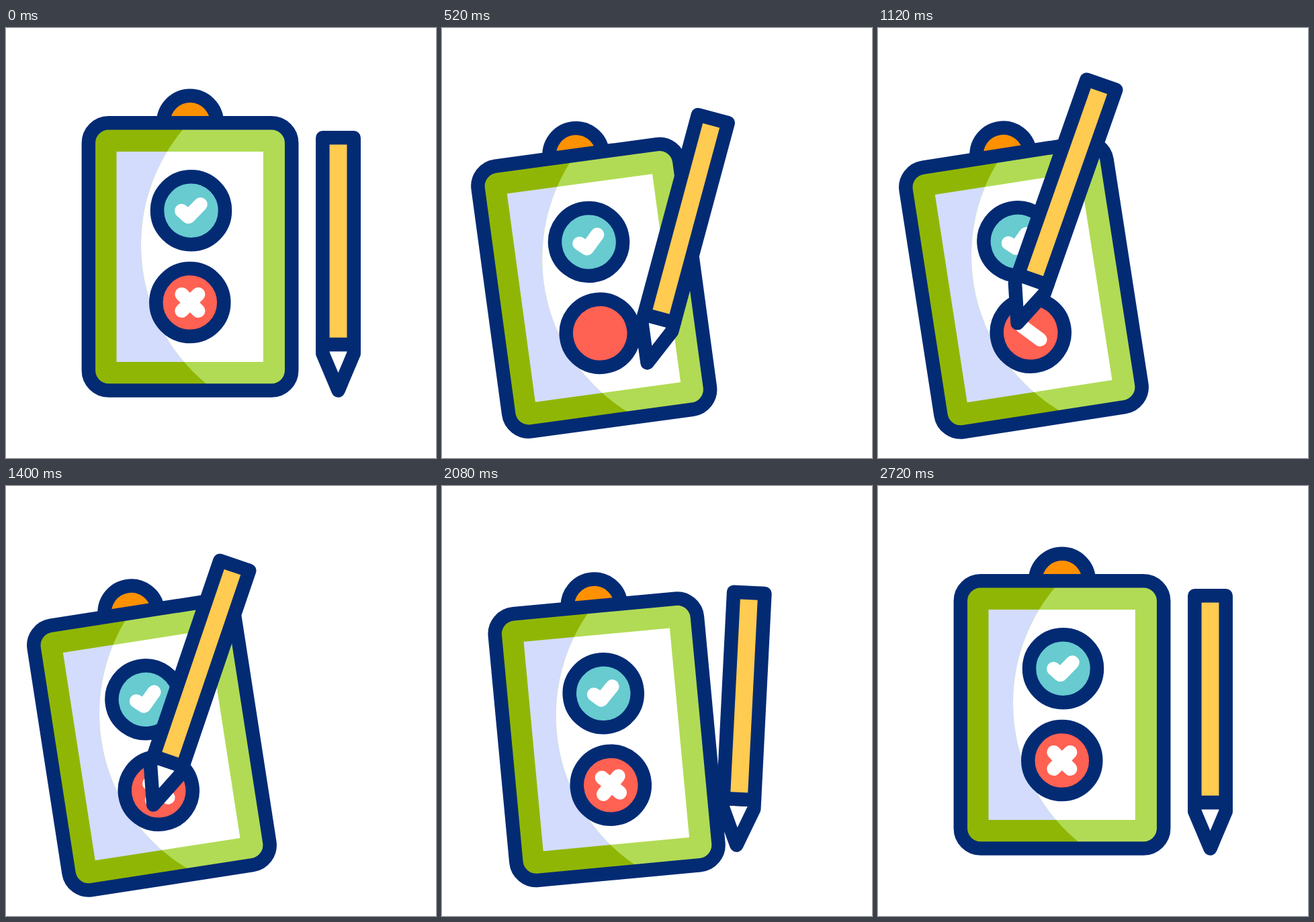
Write an HTML page that moves like this. It is 640 px wide and 640 px high and loops after 2.84 s.

```html
<!DOCTYPE html>
<html lang="en">
<head>
<meta charset="utf-8">
<title>Clipboard and pencil</title>
<style>
  html, body { margin: 0; width: 100%; height: 100%; overflow: hidden; background: #fff; }
  svg { display: block; width: 100%; height: 100%; }
  .line { stroke: #032b74; stroke-width: 20.5; stroke-linejoin: round; }
  .mark { fill: none; stroke: #fff; stroke-width: 20.5; stroke-linecap: round; stroke-linejoin: round; }
</style>
</head>
<body>
<svg viewBox="0 0 640 640">
  <defs>
    <clipPath id="light"><circle cx="469.5" cy="323" r="268.5"/></clipPath>
  </defs>
  <g id="board">
    <circle class="line" cx="274" cy="140.6" r="39.8" fill="#ff9100"/>
    <rect x="122.8" y="141.2" width="302.4" height="398.3" rx="30" fill="#90b605"/>
    <rect x="164.5" y="184" width="218.3" height="313" fill="#d3dcfd"/>
    <g clip-path="url(#light)">
      <rect x="122.8" y="141.2" width="302.4" height="398.3" rx="30" fill="#b1db54"/>
      <rect x="164.5" y="184" width="218.3" height="313" fill="#fff"/>
    </g>
    <rect class="line" x="122.8" y="141.2" width="302.4" height="398.3" rx="30" fill="none"/>
    <circle class="line" cx="275.5" cy="271.7" r="50.5" fill="#67cbd0"/>
    <path class="mark" d="M261.3 272L271.5 281L289.5 262.5"/>
    <circle class="line" cx="273.8" cy="408.6" r="50.5" fill="#ff6152"/>
    <path class="mark" id="fall"/>
    <path class="mark" id="rise"/>
  </g>
  <g id="pencil" class="line">
    <path d="M-23.2 -68.5V-55L0 0L23.2 -55V-68.5Z" fill="#fff"/>
    <path d="M-23.2 -376.2H23.2V-68.5H-23.2Z" fill="#ffcb50"/>
  </g>
</svg>
<script>
const LOOP = 2840, STEP = 40;
const byId = id => document.getElementById(id);
const clamp = v => Math.min(1, Math.max(0, v));
const mix = (a, b, k) => a + (b - a) * k;

// Easing curve with handles (x1, 0) and (x2, 1)
const bezier = (x1, x2) => x => {
  x = clamp(x);
  let lo = 0, hi = 1;
  for (let i = 0; i < 30; i++) {
    const u = (lo + hi) / 2, v = 1 - u;
    if (3 * u * v * v * x1 + 3 * u * u * v * x2 + u * u * u < x) lo = u; else hi = u;
  }
  return lo * lo * (3 - 2 * lo);
};
const smooth = bezier(.33, .67), settle = bezier(.35, .15);

// Returns the point a share k of the way along a path
function track(d) {
  const path = document.createElementNS('http://www.w3.org/2000/svg', 'path');
  path.setAttribute('d', d);
  const length = path.getTotalLength();
  return k => path.getPointAtLength(k * length);
}

const boardTrack = track('M0 0C-6.5 21 -40.5 53.5 -57 45.5');

// Pencil tip: start, end, route, angles, easing of position and of angle
const moves = [
  [0, 765, 'M494.5 539.5C415 543 300 503 250 470', 0, 19.9, smooth, smooth],
  [765, 1080, 'M250 470L207 437', 19.9, 19.4, smooth, smooth],
  [1080, 1360, 'M207 437L217.4 477.4', 19.4, 18.8, smooth, smooth],
  [1360, 1640, 'M217.4 477.4L250 427.5', 18.8, 18.2, smooth, smooth],
  [1640, 2418, 'M250 427.5C262 470 400 544 494.5 539.5', 18.2, 0, bezier(.42, .3), bezier(.35, .23)]
].map(([start, end, route, from, to, go, spin]) => ({ start, end, at: track(route), from, to, go, spin }));

function drawStroke(id, x1, y1, x2, y2, k) {
  byId(id).setAttribute('d', k > 0 ? `M${x1} ${y1}L${mix(x1, x2, k)} ${mix(y1, y2, k)}` : '');
}

function render(t) {
  const tilt = settle(t / 900) - settle((t - 1840) / 880);
  const shift = boardTrack(clamp(tilt));
  byId('board').setAttribute('transform',
    `translate(${shift.x} ${shift.y}) rotate(${-8.8 * tilt} 273.7 340.5)`);

  const erased = 1 - smooth(t / 280);
  drawStroke('fall', 286.2, 421, 261.6, 396.2, Math.max(erased, smooth((t - 800) / 280)));
  drawStroke('rise', 261.6, 421, 286.2, 396.2, Math.max(erased, smooth((t - 1360) / 280)));

  const move = moves.find(m => t < m.end) || moves[moves.length - 1];
  const k = (t - move.start) / (move.end - move.start);
  const tip = move.at(move.go(k));
  byId('pencil').setAttribute('transform',
    `translate(${tip.x} ${tip.y}) rotate(${mix(move.from, move.to, move.spin(k))})`);
}

const begin = performance.now();
function tick() {
  const t = (performance.now() - begin) % LOOP;
  render(Math.min(2720, Math.floor(t / STEP) * STEP));
  requestAnimationFrame(tick);
}
tick();
</script>
</body>
</html>
```
